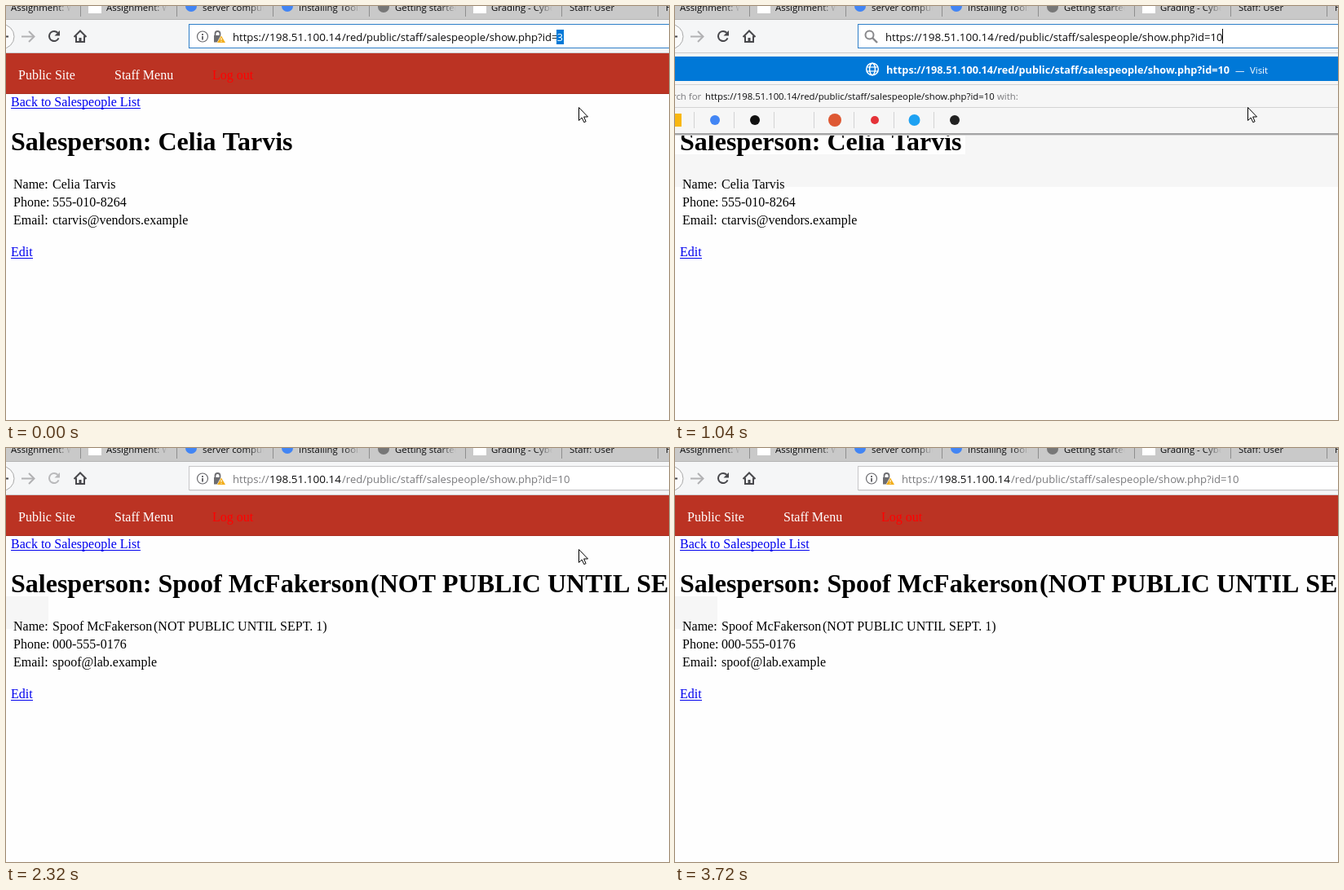
An HTML page with a canvas for the animation above (4840 ms loop, 813 by 508 pixels).

```html
<!DOCTYPE html>
<html lang="en">
<head>
<meta charset="utf-8">
<title>Staff page</title>
<style>
html, body { margin: 0; width: 100%; height: 100%; overflow: hidden; background: #fefefe; }
canvas { display: block; width: 813px; height: 508px; }
</style>
</head>
<body>
<canvas id="stage" width="813" height="508"></canvas>
<script>
const ctx = document.getElementById('stage').getContext('2d');
const W = 813, H = 508, LOOP = 4840;
const UI = '"Open Sans", "Noto Sans", sans-serif';
const SERIF = '"Liberation Serif", "Noto Serif", serif';
const INK = '#0c0c0d', ICON = '#48484c';
const HOST = '198.51.100.14';
const PATH = '/red/public/staff/salespeople/show.php?id=';
const URL10 = 'https://' + HOST + PATH + '10';
const NOTE = '(NOT PUBLIC UNTIL SEPT. 1)';
const PEOPLE = [
  { name: 'Celia Tarvis', note: '', phone: '555-010-8264', email: 'ctarvis@vendors.example' },
  { name: 'Spoof McFakerson', note: NOTE, phone: '000-555-0176', email: 'spoof@lab.example' }
];

// Pointer tip: time, x, y; each place is held until the next step
const POINTER = [
  [0, 702, 124], [2580, 694, 153], [2700, 679, 206], [2820, 665, 264],
  [2940, 665, 347], [3060, 670, 430], [3210, 677, 451], [3330, 684, 467],
  [3450, 690, 482], [3570, 696, 495], [3720, 696, 600]
];

function rect(x, y, w, h, color) {
  ctx.fillStyle = color;
  ctx.fillRect(x, y, w, h);
}

function dot(x, y, r, color) {
  ctx.fillStyle = color;
  ctx.beginPath();
  ctx.arc(x, y, r, 0, Math.PI * 2);
  ctx.fill();
}

function ring(x, y, r, color, width) {
  ctx.strokeStyle = color;
  ctx.lineWidth = width;
  ctx.beginPath();
  ctx.arc(x, y, r, 0, Math.PI * 2);
  ctx.stroke();
}

function trace(points, closed) {
  ctx.beginPath();
  points.forEach(([x, y]) => ctx.lineTo(x, y));
  if (closed) ctx.closePath();
}

function line(points, color, width) {
  ctx.strokeStyle = color;
  ctx.lineWidth = width;
  trace(points);
  ctx.stroke();
}

function shape(points, color) {
  ctx.fillStyle = color;
  trace(points, true);
  ctx.fill();
}

function text(str, x, y, color, size, family = UI, weight = 400) {
  ctx.font = `${weight} ${size}px ${family}`;
  ctx.fillStyle = color;
  ctx.fillText(str, x, y);
}

function serif(str, x, y, color = '#000') {
  text(str, x, y, color, 16, SERIF);
}

function link(str, x, y, width) {
  serif(str, x, y, '#0000ee');
  rect(x, y + 2, width, 1, '#0000ee');
}

function drawPage(person) {
  rect(0, 58, W, 50, '#bb3323');
  rect(0, 107, W, 1, '#a92e20');
  serif('Public Site', 15, 90, '#fff');
  serif('Staff Menu', 133, 90, '#fff');
  serif('Log out', 253, 90, '#ff0000');
  link('Back to Salespeople List', 6, 123, 159);
  text('Salesperson: ' + person.name, 6, 177, '#000', 32, SERIF, 700);
  text(person.note, 447, 177, '#000', 32, SERIF, 700);
  const rows = [['Name:', person.name], ['Phone:', person.phone], ['Email:', person.email]];
  rows.forEach(([label, value], i) => {
    serif(label, 9, 224 + i * 22);
    serif(value, 57, 224 + i * 22);
  });
  serif(person.note, 181, 224);
  link('Edit', 6, 307, 27);
}

// Grey patch left behind by the closed suggestion list
function drawPatch(t) {
  const grey = '#f6f6f6';
  if (t >= 2320) {
    rect(0, 182, 52, 40, grey);
  } else if (t >= 640) {
    const top = t < 1590 ? 157 : 162;
    rect(356, top, W - 356, 182 - top, grey);
    rect(0, 182, W, 40, grey);
  }
}

function drawTabs() {
  rect(0, 0, W, 16, '#c9c9c9');
  rect(0, 16, W, 1, '#b4b4b4');
  const titles = ['Assignment: Week', 'Assignment: Week', 'server computing', 'Installing Tools kit',
    'Getting started now', 'Grading - Cyber', 'Staff: User', 'Home'];
  titles.forEach((title, i) => {
    const left = 118 * i - 27;
    const hasIcon = i > 0 && i < 6;
    const x = i ? left + (hasIcon ? 32 : 10) : 6;
    const fade = ctx.createLinearGradient(left + 87, 0, left + 107, 0);
    fade.addColorStop(0, INK);
    fade.addColorStop(1, 'rgba(12,12,13,0)');
    text(title, x, 6, fade, 11.4);
    if (i) rect(left, 0, 1, 13, '#8e8e8e');
  });
  rect(101, 0, 16, 9, '#fff');
  rect(573, 0, 16, 9, '#fff');
  dot(227, 0, 7, '#4285f4');
  dot(345, 0, 7, '#4285f4');
  dot(463, 1, 7, '#777');
}

function drawReload(color, turn) {
  ctx.save();
  ctx.translate(59, 37);
  ctx.rotate(turn);
  ctx.strokeStyle = color;
  ctx.lineWidth = 2;
  ctx.beginPath();
  ctx.arc(0, 0, 6, 0.4, Math.PI * 2 - 0.75);
  ctx.stroke();
  shape([[7, -7], [7, -0.5], [0.5, -0.5]], color);
  ctx.restore();
}

function drawStop(r) {
  line([[59 - r, 37 - r], [59 + r, 37 + r]], ICON, 2);
  line([[59 - r, 37 + r], [59 + r, 37 - r]], ICON, 2);
}

function drawButtons(t) {
  dot(-5, 37.5, 15, '#fbfbfb');
  ring(-5, 37.5, 15, '#a9a9a9', 1);
  rect(0, 36.5, 3, 2, ICON);
  line([[19, 37.5], [34, 37.5]], '#b1b1b3', 2);
  line([[28, 31], [34.5, 37.5], [28, 44]], '#b1b1b3', 2);

  if (t < 1590 || t >= 3060) drawReload(ICON, 0);
  else if (t < 1710) drawReload(ICON, 0.25);
  else if (t < 1870) drawReload(ICON, 0.8);
  else if (t < 2020) drawStop(4.5);
  else if (t < 2320) drawStop(6);
  else drawReload('#b9b9bb', 0);

  line([[83.5, 38], [91, 30.5], [98.5, 38]], ICON, 2);
  line([[86, 36.5], [86, 44], [96, 44], [96, 36.5]], ICON, 2);
  rect(89.5, 39, 3, 5, ICON);
}

function drawSiteIcons() {
  const grey = '#6c6c70';
  ring(241, 37.5, 6.5, grey, 1.2);
  rect(240, 34, 2, 2, grey);
  rect(240, 37, 2, 4.5, grey);
  ctx.lineWidth = 1.8;
  ctx.beginPath();
  ctx.moveTo(256.5, 37);
  ctx.arc(259.5, 34, 3, Math.PI, 0);
  ctx.lineTo(262.5, 37);
  ctx.stroke();
  rect(255, 36, 9, 8.5, grey);
  shape([[264, 35], [270, 46], [258, 46]], '#fff');
  shape([[264, 36.5], [269, 45], [259, 45]], '#f2ae1c');
  rect(263.5, 39, 1, 3, '#fff');
  rect(263.5, 43, 1, 1, '#fff');
}

function drawSearchIcon() {
  ring(238.5, 35.5, 5, '#88888b', 2);
  line([[242, 39], [248, 45]], '#88888b', 2.4);
}

function drawAddress(t) {
  const focused = t < 1590;
  const searching = t >= 250 && t < 2170;
  rect(224, 22, W, 30, focused ? '#2f7fc9' : '#c6c6c8');
  rect(225, 23, W, 28, '#fff');
  if (!focused) rect(225, 52, W, 1, '#e4e4e5');
  if (searching) drawSearchIcon(); else drawSiteIcons();

  const x = searching ? 258 : 278;
  const soft = focused ? INK : '#7a7a7d';
  text('https://', x, 43, soft, 13.1);
  text(HOST, x + 45, 43, INK, 13.5);
  text(PATH + (t < 250 ? '' : '10'), x + 134, 43, soft, 13.1);
  if (t < 250) {
    rect(675, 29, 9, 18, '#0078d7');
    text('3', 675.5, 43, '#fff', 13.1);
  }
  const caret = focused && t >= 250 && (t < 760 || t >= 1040);
  if (caret) rect(671, 28, 1, 18, '#000');
}

function drawGlobe(x, y, color) {
  ring(x, y, 7.3, color, 1.5);
  ctx.beginPath();
  ctx.ellipse(x, y, 3.4, 7.3, 0, 0, Math.PI * 2);
  ctx.stroke();
  line([[x - 7, y - 2.5], [x + 7, y - 2.5]], color, 1.2);
  line([[x - 7, y + 2.5], [x + 7, y + 2.5]], color, 1.2);
}

function drawMatches() {
  const [first, second] = PEOPLE;
  const title = 'Staff: Salesperson ';
  rect(215, 103, 12, 7, '#5c5c5f');
  rect(212, 110, 17, 2, '#5c5c5f');
  drawGlobe(242, 107.5, '#666669');
  text(title + second.name, 259, 113, INK, 12.9);
  text(NOTE, 485, 113, INK, 13.2);
  text('—', 666, 113, '#777', 11.4);
  text('Switch to Tab', 684, 113, '#169a83', 11.4);
  drawGlobe(242, 137.5, '#666669');
  text(title + first.name, 259, 143, INK, 12.9);
  text('—', 448, 143, '#777', 11.4);
  text(URL10, 466, 143, '#2076d2', 11.5);
}

function drawEngines(y) {
  const engines = [[49, 6, '#4285f4'], [98, 6, '#111'], [196, 8, '#de5833'],
    [245, 5, '#e53238'], [293.5, 7, '#1da1f2'], [343, 6, '#222']];
  rect(-8, y - 8, 16, 16, '#f9b70f');
  engines.forEach(([x, r, color]) => dot(x, y, r, color));
  for (let x = 23; x <= 317; x += 49) rect(x, y - 10, 1, 20, '#d3d3d4');
}

// The lower rows empty first, then the list shrinks to its top row
function drawSuggestions(t) {
  const rows = t < 640 ? 3 : 1;
  const y = 66 + rows * 30;
  rect(0, 58, W, y + 2, '#f6f6f6');
  rect(0, 62, W, 30, '#0078d7');
  drawGlobe(242, 77.5, '#fff');
  text(URL10, 259, 83, '#fff', 12.7, UI, 700);
  text('—', 687, 83, '#fff', 11.4);
  text('Visit', 705, 83, '#fff', 11.4);
  if (t < 520) drawMatches();

  rect(0, y, W, 1, '#d3d3d4');
  text('Search for', -22, y + 19, '#7a7a7d', 11.4);
  text(URL10, 37, y + 19, INK, 11.35);
  text('with:', 395, y + 19, '#7a7a7d', 11.4);
  rect(0, y + 28, W, 1, '#d3d3d4');
  drawEngines(y + 44);
  rect(0, y + 60, W, 2, '#a4a4a5');
  rect(0, y + 62, W, 1, '#d9d9d9');
}

function drawPointer(t) {
  const [, x, y] = POINTER.filter(([start]) => start <= t).pop();
  ctx.save();
  ctx.translate(x + 0.5, y + 0.5);
  shape([[0, 0], [0, 16], [3.7, 12.6], [6.3, 18.2], [8.6, 17.2], [6.1, 11.5], [11, 11.5]], '#fff');
  ctx.strokeStyle = '#000';
  ctx.lineWidth = 1;
  ctx.stroke();
  ctx.restore();
}

function draw(t) {
  rect(0, 0, W, H, '#fefefe');
  drawPatch(t);
  drawPage(PEOPLE[t < 2320 ? 0 : 1]);
  rect(0, 17, W, 41, '#f5f6f7');
  rect(0, 57, W, 1, '#cccccd');
  drawTabs();
  drawButtons(t);
  if (t >= 250 && t < 1590) drawSuggestions(t);
  drawAddress(t);
  drawPointer(t);
}

const start = performance.now();
function tick() {
  draw((performance.now() - start) % LOOP);
  requestAnimationFrame(tick);
}
tick();
</script>
</body>
</html>
```
